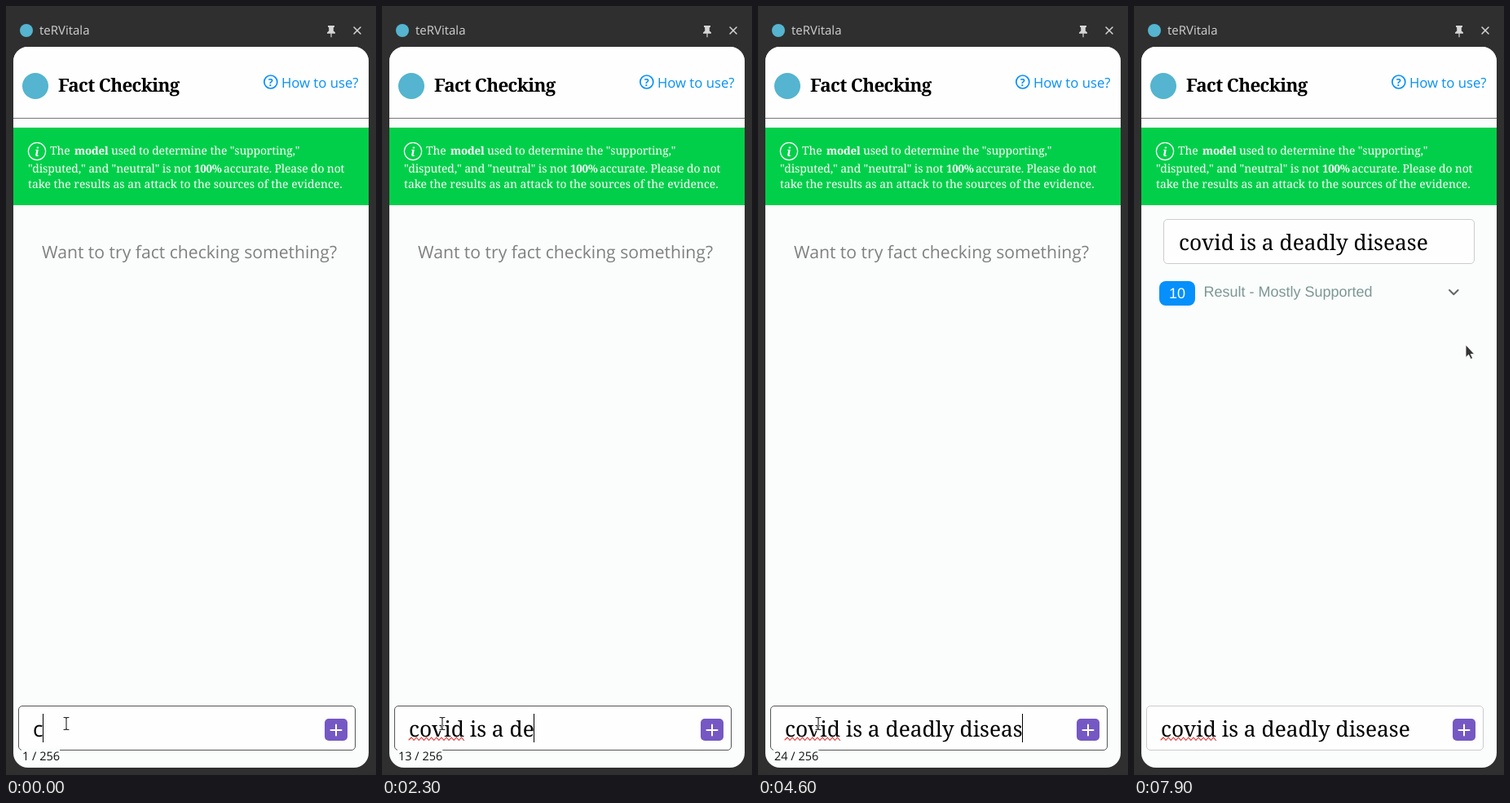
Recreate the animation shown at these times as an HTML page. Size 454 by 942 pixels, loop 8000 ms.

```html
<!DOCTYPE html>
<html lang="en">
<head>
<meta charset="utf-8">
<title>Fact Checking</title>
<style>
html, body { margin: 0; width: 100%; height: 100%; overflow: hidden; background: #2f2f2f; }
svg { display: block; width: 454px; height: 942px; }
text { white-space: pre; text-rendering: geometricPrecision; }
.serif { font-family: "Noto Serif", serif; }
.sans { font-family: "Open Sans", "Noto Sans", sans-serif; font-weight: 500; }
.arial { font: 18px "Liberation Sans", sans-serif; }
.note { font-size: 13.9px; fill: #fff; }
.tight { letter-spacing: -.12px; }
.bold { font-size: 13.4px; font-weight: 700; letter-spacing: -.2px; }
.claim { font-size: 26.3px; fill: #000; }
.line { fill: none; stroke-linecap: round; stroke-linejoin: round; }
</style>
</head>
<body>
<svg viewBox="0 0 454 942">
  <rect width="454" height="942" fill="#2f2f2f"/>

  <!-- title bar -->
  <circle cx="25" cy="30" r="8" fill="#55b4cf"/>
  <text class="sans" x="41" y="35" font-size="15" fill="#d2d2d2">teRVitala</text>
  <path d="M395 24h8v1.5l-1.2 1v4l2.2 2v1.2h-4.4v4l-.6 1-.6-1v-4h-4.4v-1.2l2.2-2v-4l-1.2-1z" fill="#d6d6d6"/>
  <path class="line" d="M427 26l8 8m0-8l-8 8" stroke="#d6d6d6" stroke-width="1.5"/>

  <!-- panel -->
  <rect x="9" y="50" width="436" height="883" rx="18" fill="#fafdfc"/>
  <path d="M9 137V68a18 18 0 0 1 18-18H427a18 18 0 0 1 18 18V137z" fill="#fefefe"/>
  <rect x="9" y="137" width="436" height="1" fill="#777"/>
  <circle cx="36" cy="98" r="16" fill="#55b4cf"/>
  <text class="serif" x="64" y="105" font-size="22.4" font-weight="700" letter-spacing="-.65">Fact Checking</text>
  <circle class="line" cx="324.8" cy="93" r="8" stroke="#0590f8" stroke-width="1.7"/>
  <text class="sans" x="324.8" y="97.6" font-size="12.5" style="font-weight:700" fill="#0590f8" text-anchor="middle">?</text>
  <text class="sans" x="338" y="100" font-size="16.7" fill="#0590f8">How to use?</text>

  <!-- notice -->
  <rect x="9" y="149" width="436" height="95" fill="#02cf49"/>
  <circle class="line" cx="38" cy="178" r="10.6" stroke="#fff" stroke-width="1.2"/>
  <text class="serif" x="38" y="183.5" font-size="15" font-weight="700" font-style="italic" fill="#fff" text-anchor="middle">i</text>
  <g class="serif note">
    <text x="54" y="182">The</text>
    <text class="bold" x="84" y="182">model</text>
    <text class="tight" x="129" y="182">used to determine the "supporting,"</text>
    <text class="tight" x="27" y="204">"disputed," and "neutral" is not</text>
    <text class="bold" x="231" y="204">100%</text>
    <text class="tight" x="267" y="204">accurate. Please do not</text>
    <text x="27" y="223">take the results as an attack to the sources of the evidence.</text>
  </g>

  <text id="hint" class="sans" x="44" y="309" font-size="21.15" fill="#808080">Want to try fact checking something?</text>

  <g id="result">
    <rect x="36.5" y="261.5" width="381" height="54" rx="4.5" fill="#fefefe" stroke="#ccc"/>
    <text class="serif claim" x="55" y="299">covid is a deadly disease</text>
    <rect x="31" y="337" width="44" height="30" rx="8" fill="#0590fb"/>
    <text class="arial" x="53" y="358" fill="#fff" text-anchor="middle">10</text>
    <text class="arial" x="85.5" y="356" fill="#7c9794">Result - Mostly Supported</text>
    <path class="line" d="M387 348l5.3 5.3 5.3-5.3" stroke="#666" stroke-width="2"/>
  </g>

  <!-- input -->
  <rect id="field" x="15.5" y="857.5" width="413" height="54" rx="4.5" fill="#fefefe"/>
  <g id="counter">
    <rect id="patch" x="19" y="909" height="18" fill="#fafdfc"/>
    <text id="count" class="sans" x="20" y="924" font-size="14.5" fill="#111"></text>
  </g>
  <path id="wave" class="line" stroke="#e62b2b" stroke-width="1.1"/>
  <text id="typed" class="claim" x="33" y="895"></text>
  <rect id="caret" y="867" width="1" height="35"/>
  <rect x="391" y="873" width="28" height="27" rx="5" fill="#7558c3"/>
  <path class="line" d="M398.5 887h13M405 880.5v13" stroke="#fff" stroke-width="2"/>

  <!-- pointers, hot spot at 0,0 -->
  <g id="beam" class="line">
    <path d="M-3-7.5h2l1 1 1-1h2M-3 7.5h2l1-1 1 1h2M0-6.5v13" stroke="#fff" stroke-width="2.6"/>
    <path d="M-3-7.5h2l1 1 1-1h2M-3 7.5h2l1-1 1 1h2M0-6.5v13" stroke="#222" stroke-width="1.1"/>
  </g>
  <path id="hand" d="M-1.6 1a1.6 1.6 0 0 1 3.2 0V6.5Q3 5.5 4.4 7Q6.5 6.4 7 8Q9.3 7.6 9.4 10V13L7.8 16V18H-.8V16L-5.4 10.6Q-5.4 8.4-3.4 9L-1.6 10.6z" fill="#333" stroke="#fff"/>
  <path id="arrow" d="M0 0V15.5L3.6 12.2L6.2 17.6L8.6 16.4L6.2 11.4H10.8z" fill="#333" stroke="#fff" stroke-width=".9" stroke-linejoin="round"/>
</svg>
<script>
const LOOP = 8000, STEP = 100, BLINK = 500, SENT = 6500;
const CLAIM = "covid is a deadly disease";
// time at which each character appears
const KEYS = [0, 100, 300, 500, 700, 800, 1000, 1100, 1300, 1500, 1700, 1900, 2100,
  2500, 2600, 2700, 2900, 3300, 3400, 3500, 4300, 4400, 4500, 4600, 4800];
// pointer track: time, x, y
const TRACK = [
  [5100, 74, 879], [5200, 92, 878], [5400, 220, 871], [5600, 385, 863],
  [5700, 440, 850], [5800, 442, 848], [5900, 424, 860], [6000, 407, 870],
  [6200, 402, 886], [6300, 402, 887], [7500, 402, 887], [7600, 408, 868],
  [7700, 416, 740], [7800, 416, 530], [7900, 407, 415]
];

const $ = id => document.getElementById(id);
const [hint, result, field, counter, patch, count, wave, typed, caret, beam, hand, arrow] =
  ["hint", "result", "field", "counter", "patch", "count", "wave", "typed", "caret", "beam", "hand", "arrow"].map($);
const show = (el, on) => el.setAttribute("visibility", on ? "visible" : "hidden");
const inside = (x, y, l, t, r, b) => x >= l && x <= r && y >= t && y <= b;

let zig = "M33 899";
for (let i = 1; i <= 22; i++) zig += `L${33 + i * 3.07} ${i % 2 ? 896 : 899.5}`;
wave.setAttribute("d", zig);

function pointerAt(t) {
  const i = TRACK.findIndex(p => p[0] >= t);
  if (i < 0) return TRACK[TRACK.length - 1].slice(1);
  if (i === 0) return TRACK[0].slice(1);
  const [t0, x0, y0] = TRACK[i - 1], [t1, x1, y1] = TRACK[i];
  const k = (t - t0) / (t1 - t0);
  return [x0 + (x1 - x0) * k, y0 + (y1 - y0) * k];
}

function drawInput(t) {
  const n = KEYS.filter(k => k <= t).length;
  const focused = t < SENT;
  typed.textContent = CLAIM.slice(0, n);
  typed.setAttribute("class", n === 1 ? "sans claim" : "serif claim");
  caret.setAttribute("x", Math.round(32.5 + typed.getComputedTextLength()));
  show(caret, focused && Math.floor((t - KEYS[n - 1]) / BLINK) % 2 === 0);
  show(wave, n > 5);
  count.textContent = n + " / 256";
  patch.setAttribute("width", count.getComputedTextLength() + 1);
  show(counter, focused);
  field.setAttribute("stroke", focused ? "#555" : "#ccc");
  show(hint, focused);
  show(result, !focused);
}

function drawPointer(t) {
  const [x, y] = pointerAt(t);
  const overButton = inside(x, y, 391, 873, 419, 900);
  const overField = inside(x, y, 15, 857, 429, 912);
  const shape = overButton ? hand : overField ? beam : arrow;
  for (const el of [beam, hand, arrow]) show(el, el === shape);
  shape.setAttribute("transform", `translate(${Math.round(x)} ${Math.round(y)})`);
}

const start = performance.now();
function frame() {
  const t = Math.floor((performance.now() - start) % LOOP / STEP) * STEP;
  drawInput(t);
  drawPointer(t);
  requestAnimationFrame(frame);
}
frame();
</script>
</body>
</html>
```
